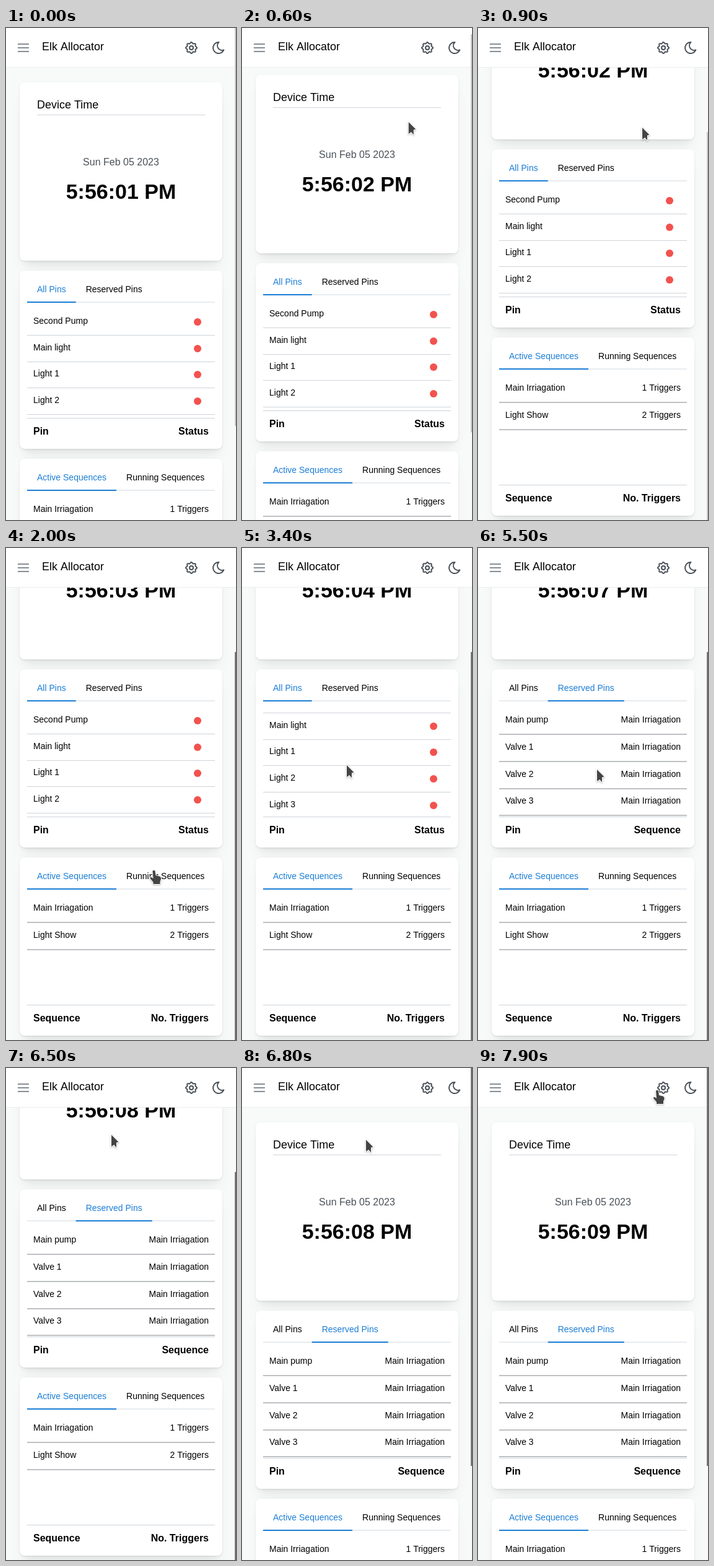
An HTML page with a canvas for the animation above (8 s loop, 371 by 795 pixels).

```html
<!DOCTYPE html>
<html lang="en">
<head>
<meta charset="utf-8">
<title>Device dashboard</title>
<style>
  html, body { margin: 0; width: 100%; height: 100%; overflow: hidden; background: #f8f9fa; }
  canvas { display: block; width: 371px; height: 795px; }
</style>
</head>
<body>
<canvas id="stage"></canvas>
<script>
const W = 371, H = 795, LOOP = 8000, STEP = 100;
const FONT = '"Liberation Sans", Arial, sans-serif';
const BLUE = '#1c7ed6', RED = '#f2524e', GREEN = '#4bad5f', RULE = '#ced4da';
const canvas = document.getElementById('stage');
const ctx = canvas.getContext('2d');
const dpr = window.devicePixelRatio || 1;
canvas.width = W * dpr;
canvas.height = H * dpr;

const PINS = ['Second Pump', 'Main light', 'Light 1', 'Light 2', 'Light 3', 'Main pump',
  'Valve 1', 'Valve 2', 'Valve 3', 'Valve 4', 'Irrigation indicator'];
const ACTIVE_PINS = ['Main pump', 'Valve 2', 'Irrigation indicator'];
const RESERVED = ['Main pump', 'Valve 1', 'Valve 2', 'Valve 3', 'Valve 4', 'Irrigation indicator']
  .map(name => [name, 'Main Irriagation']);
const SEQUENCES = [['Main Irriagation', '1 Triggers'], ['Light Show', '2 Triggers']];
const RUNNING = [['Main Irriagation', 'Running']];

const TICKS = [400, 1400, 2400, 3500, 4500, 5500, 6500, 7500];

// time, x, y of the pointer tip
const POINTER = [
  [100, 137, 232], [200, 185, 190], [300, 240, 160], [400, 270, 149], [500, 270, 149],
  [900, 265, 161], [1400, 262, 190], [1500, 261, 215], [1900, 240, 515], [2100, 237, 527],
  [2300, 158, 522], [2400, 150, 523], [2800, 150, 523], [2900, 171, 360], [3100, 171, 360],
  [3400, 169, 351], [4000, 169, 351], [4400, 145, 245], [4500, 141, 233], [4800, 147, 233],
  [4900, 186, 290], [5500, 192, 358], [6300, 185, 300], [6500, 170, 108], [6800, 200, 116],
  [7000, 200, 116], [7900, 289, 36]
];

const within = (t, a, b) => t >= a && t < b;

function ease(t, from, to) {
  const p = Math.min(1, Math.max(0, (t - from) / (to - from)));
  return p * p * (3 - 2 * p);
}

function pointerAt(t) {
  const i = POINTER.findIndex(k => k[0] > t);
  if (i < 0) return POINTER[POINTER.length - 1].slice(1);
  const a = POINTER[i - 1], b = POINTER[i];
  const p = (t - a[0]) / (b[0] - a[0]);
  return [a[1] + (b[1] - a[1]) * p, a[2] + (b[2] - a[2]) * p];
}

function text(str, x, y, { size = 14, color = '#000', bold = false, align = 'left' } = {}) {
  ctx.font = `${bold ? 'bold ' : ''}${size}px ${FONT}`;
  ctx.fillStyle = color;
  ctx.textAlign = align;
  ctx.fillText(str, x, y);
}

function rect(x, y, w, h, color) {
  ctx.fillStyle = color;
  ctx.fillRect(x, y, w, h);
}

function dot(x, y, r, color) {
  ctx.fillStyle = color;
  ctx.beginPath();
  ctx.arc(x, y, r, 0, 7);
  ctx.fill();
}

function card(y) {
  const layer = (inset, dy, blur, alpha) => {
    ctx.shadowColor = `rgba(0,0,0,${alpha})`;
    ctx.shadowOffsetY = dy * dpr;
    ctx.shadowBlur = blur * dpr;
    ctx.beginPath();
    ctx.roundRect(22 + inset, y + inset, 327 - 2 * inset, 288 - 2 * inset, 8);
    ctx.fill();
  };
  ctx.save();
  ctx.fillStyle = '#fff';
  layer(5, 20, 25, .05);
  layer(5, 10, 10, .04);
  layer(0, 1, 3, .1);
  ctx.restore();
}

function tabs(y, names, active) {
  rect(34, y + 50, 303, 2, '#e9ecef');
  let x = 34;
  names.forEach((name, i) => {
    const on = i === active;
    text(name, x + 16, y + 35, { color: on ? BLUE : '#000' });
    const w = ctx.measureText(name).width + 32;
    if (on) rect(x, y + 50, w, 2, BLUE);
    x += w;
  });
}

function panel(y, names, active, foot, rowHeight, scroll, rows, drawEnd) {
  card(y);
  tabs(y, names, active);
  ctx.save();
  ctx.beginPath();
  ctx.rect(34, y + 62, 303, 176);
  ctx.clip();
  rows.forEach((row, i) => {
    const top = y + 62 + i * rowHeight - scroll;
    text(row[0], 44, Math.round(top + 24));
    drawEnd(row, top);
    if (rowHeight > 43) rect(34, Math.round(top + 42), 303, 2, '#bfc1c4');
    else rect(34, Math.round(top + 42), 303, 1, RULE);
  });
  ctx.restore();
  rect(34, y + 238, 303, 1, RULE);
  text(foot[0], 44, y + 265, { size: 16, bold: true });
  text(foot[1], 327, y + 265, { size: 16, bold: true, align: 'right' });
}

const endText = (row, top) => text(row[1], 327, Math.round(top + 24), { align: 'right' });
const endDot = (row, top) =>
  dot(309, Math.round(top + 21), 6, ACTIVE_PINS.includes(row[0]) ? GREEN : RED);

function clockCard(t) {
  card(88);
  text('Device Time', 50, 130, { size: 18 });
  rect(50, 140, 271, 1, RULE);
  text('Sun Feb 05 2023', 185.5, 222, { size: 16, color: '#495057', align: 'center' });
  const sec = 1 + TICKS.filter(k => t >= k).length;
  text(`5:56:0${sec} PM`, 185.5, 276, { size: 34, bold: true, align: 'center' });
}

function pinsPanel(t) {
  const names = ['All Pins', 'Reserved Pins'];
  if (t < 4700) {
    const scroll = 293.7 * ease(t, 3230, 4030);
    panel(392, names, 0, ['Pin', 'Status'], 42.7, scroll, PINS.map(p => [p]), endDot);
  } else {
    const scroll = 86 * (ease(t, 5650, 5950) - ease(t, 6050, 6350));
    panel(392, names, 1, ['Pin', 'Sequence'], 43.75, scroll, RESERVED, endText);
  }
}

function sequencePanel(t) {
  const running = within(t, 2200, 2900);
  panel(696, ['Active Sequences', 'Running Sequences'], running ? 1 : 0,
    ['Sequence', running ? 'Status' : 'No. Triggers'], 43.75, 0,
    running ? RUNNING : SEQUENCES, endText);
}

function header() {
  rect(0, 0, W, 63, '#fff');
  rect(0, 63, W, 1, '#e9ecef');
  for (let i = 0; i < 3; i++) rect(19, 25 + i * 6, 18, 2, '#868e96');
  text('Elk Allocator', 58, 36, { size: 18 });

  ctx.strokeStyle = '#495057';
  ctx.lineWidth = 2;
  ctx.lineJoin = ctx.lineCap = 'round';
  ctx.beginPath();
  for (let i = 0; i < 160; i++) {
    const a = i / 160 * 2 * Math.PI, r = 8.05 + .95 * Math.cos(8 * a);
    ctx.lineTo(299 + r * Math.cos(a), 32 + r * Math.sin(a));
  }
  ctx.closePath();
  ctx.stroke();
  ctx.beginPath();
  ctx.arc(299, 32, 3, 0, 7);
  ctx.stroke();

  ctx.save();
  ctx.translate(331, 20);
  ctx.stroke(new Path2D('M12 3h.393a7.5 7.5 0 0 0 7.92 12.446a9 9 0 1 1-8.313-12.454z'));
  ctx.restore();
}

const ARROW = new Path2D('M0 0L11.5 11.5L8 12.5V20.5L4.2 16L0 19Z');
const HAND = new Path2D('M-2 1Q0-1.5 2 1L3 8L9 9.5Q12 10.5 11.5 14L10 18V22H-1V19L-6 13Q-6.5 10 -3 11.5L-1 13Z');

function pointer(t) {
  if (t < 100) return;
  const [x, y] = pointerAt(t);
  const hand = within(t, 1900, 2900) || within(t, 4400, 4900) || t >= 7800;
  const shape = hand ? HAND : ARROW;
  ctx.save();
  ctx.translate(x, y);
  ctx.lineJoin = 'round';
  ctx.lineWidth = 2;
  ctx.strokeStyle = '#fff';
  ctx.shadowColor = 'rgba(0,0,0,.3)';
  ctx.shadowBlur = 3 * dpr;
  ctx.shadowOffsetY = dpr;
  ctx.stroke(shape);
  ctx.shadowColor = 'transparent';
  ctx.fillStyle = '#444';
  ctx.fill(shape);
  ctx.restore();
}

function draw(t) {
  const scroll = Math.round(196 * (ease(t, 550, 880) - ease(t, 6530, 6800)));
  ctx.setTransform(dpr, 0, 0, dpr, 0, 0);
  rect(0, 0, W, H, '#f8f9f9');
  ctx.save();
  ctx.translate(0, -scroll);
  clockCard(t);
  pinsPanel(t);
  sequencePanel(t);
  ctx.restore();
  header();
  rect(369, scroll * 168 / 196, 2, 643, t < 1500 ? '#c8c6c2' : '#757575');
  pointer(t);
}

function loop() {
  const t = performance.now() % LOOP;
  draw(Math.floor(t / STEP) * STEP);
  requestAnimationFrame(loop);
}
loop();
</script>
</body>
</html>
```
